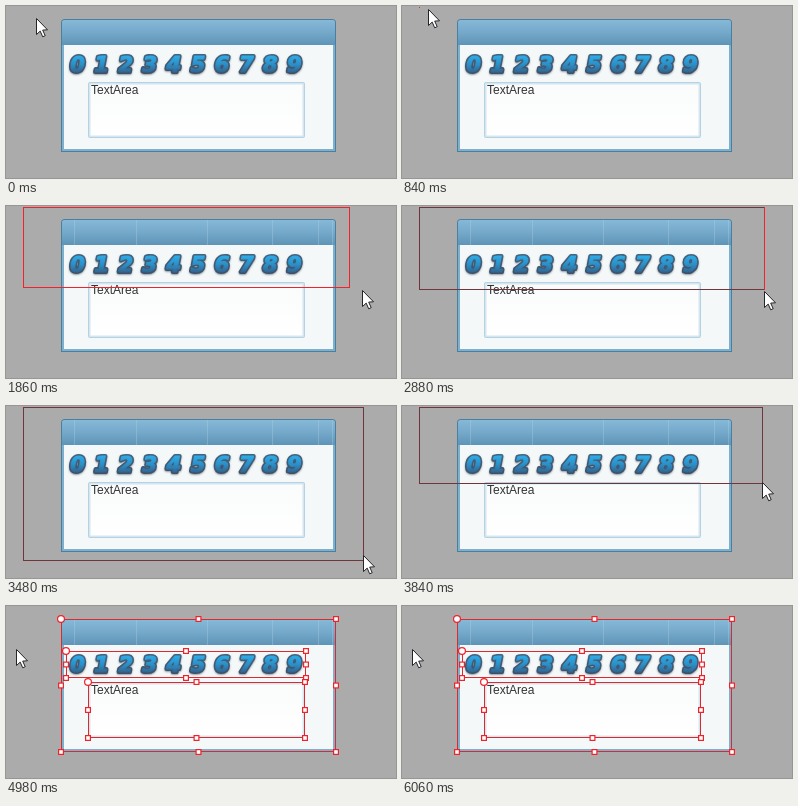
An HTML page with a canvas for the animation above (6.12 s loop, 390 px wide and 172 px high).

```html
<!DOCTYPE html>
<html lang="en">
<meta charset="utf-8">
<title>Marquee selection</title>
<style>
html, body { margin: 0; width: 390px; height: 172px; overflow: hidden; background: #ababab; }
canvas { display: block; }
</style>
<canvas id="stage" width="390" height="172"></canvas>
<script>
const ctx = document.getElementById('stage').getContext('2d');
const LOOP = 6120, STEP = 60, PRESS = 780, RELEASE = 4080;
const RED = '#f0222a', DARK = '#6f373c';

// Eased pointer moves between rests
const moves = [
  { from: 120, to: 720, x: 17, y: 1 },
  { from: 800, to: 1190, x: 326, y: 76 },
  { from: 1660, to: 2020, x: 378, y: 90 },
  { from: 2280, to: 2460, x: 362, y: 83 },
  { from: 2850, to: 3180, x: 357, y: 154 },
  { from: 3420, to: 3810, x: 360, y: 76 },
  { from: 3960, to: 4620, x: 37, y: 49 },
  { from: 4620, to: 4980, x: 10, y: 43 }
];

function pointer(t) {
  let x = 30, y = 12;
  for (const m of moves) {
    const p = Math.min(1, Math.max(0, (t - m.from) / (m.to - m.from)));
    const ease = p * p * (3 - 2 * p);
    x += (m.x - x) * ease;
    y += (m.y - y) * ease;
  }
  return [Math.round(x), Math.round(y)];
}

function gradient(y0, y1, ...colors) {
  const g = ctx.createLinearGradient(0, y0, 0, y1);
  colors.forEach((c, i) => g.addColorStop(i / (colors.length - 1), c));
  return g;
}

function box(x, y, w, h, fill, r = 0) {
  ctx.fillStyle = fill;
  ctx.beginPath();
  ctx.roundRect(x, y, w, h, r);
  ctx.fill();
}

function frame(x0, y0, x1, y1, color, right = color) {
  box(x0, y0, x1 - x0 + 1, 1, color);
  box(x0, y1, x1 - x0 + 1, 1, color);
  box(x0, y0, 1, y1 - y0 + 1, color);
  box(x1, y0, 1, y1 - y0 + 1, right);
}

function digits() {
  ctx.save();
  ctx.font = 'italic bold 21px "DejaVu Sans", sans-serif';
  ctx.textAlign = 'center';
  ctx.lineJoin = 'round';
  const edge = gradient(49, 69, '#44637d', '#3d4f66');
  const face = gradient(50, 67, '#2fabe6', '#2b8fc8', '#33618a');
  for (let n = 0; n < 10; n++) {
    const x = 71.5 + n * 24.1, y = 66;
    ctx.shadowColor = 'rgba(40,60,80,.5)';
    ctx.shadowBlur = 2;
    ctx.shadowOffsetY = 1;
    ctx.strokeStyle = edge;
    ctx.lineWidth = 4.2;
    ctx.strokeText(n, x, y);
    ctx.shadowColor = 'transparent';
    ctx.fillStyle = ctx.strokeStyle = face;
    ctx.lineWidth = 1;
    ctx.strokeText(n, x, y);
    ctx.fillText(n, x, y);
  }
  ctx.restore();
}

function panel(t) {
  box(55, 13, 275, 133, '#4b7f9f', [4, 4, 0, 0]);
  box(56, 14, 273, 131, '#7eb0cc', [3, 3, 0, 0]);
  box(56, 14, 273, 25, gradient(14, 39, '#86b8d7', '#75a9ca', '#5e94b7'), [3, 3, 0, 0]);
  box(58, 39, 269, 104, '#f5f8f8');
  // Faint traces left in the header by the first drag
  for (let s = 900; s <= 1200; s += STEP)
    if (t > s + STEP) box(pointer(s)[0], 14, 1, 25, 'rgba(190,215,230,.3)');
  digits();
  box(82, 76, 217, 56, '#b4d2e3', 2);
  box(83, 77, 215, 54, '#d5e6ef', 1);
  box(84.5, 78.5, 212, 51, gradient(78, 130, '#fafbfb', '#ffffff'));
  ctx.fillStyle = '#333';
  ctx.font = '12px "Liberation Sans", Arial, sans-serif';
  ctx.fillText('TextArea', 85, 88);
}

function handle(x, y, size, r) {
  box(x - size / 2, y - size / 2, size, size, RED, r);
  const inner = size - 2.4;
  box(x - inner / 2, y - inner / 2, inner, inner, '#fff', r);
}

function selection(x, y, w, h) {
  frame(x, y, x + w - 1, y + h - 1, '#dc282e');
  for (let i = 0; i < 3; i++)
    for (let j = 0; j < 3; j++) {
      if (i === 1 && j === 1) continue;
      const corner = i + j === 0;
      handle(x + w * i / 2, y + h * j / 2, corner ? 8 : 6, corner ? 4 : 0);
    }
}

function arrow(x, y) {
  ctx.save();
  ctx.translate(x + .5, y + .5);
  const shape = new Path2D('M0 0V16L3.7 12.6 6.2 18.3 8.7 17.2 6.2 11.6 11 11.3Z');
  ctx.fillStyle = '#fff';
  ctx.fill(shape);
  ctx.strokeStyle = '#262329';
  ctx.lineWidth = 1;
  ctx.stroke(shape);
  ctx.restore();
}

function draw(t) {
  box(0, 0, 390, 172, '#ababab');
  panel(t);
  if (t >= RELEASE) {
    selection(55, 13, 275, 133);
    selection(60, 45, 240, 27);
    selection(82, 76, 217, 56);
  } else if (t >= PRESS) {
    // The marquee trails the pointer by one step and darkens in two stages
    frame(17, 1, ...pointer(t - STEP), t < 2340 ? RED : DARK, t < 3480 ? RED : DARK);
  }
  arrow(...pointer(t));
}

const start = performance.now();
function tick() {
  const t = (performance.now() - start) % LOOP;
  draw(Math.floor(t / STEP) * STEP);
  requestAnimationFrame(tick);
}
tick();
</script>
</html>
```
